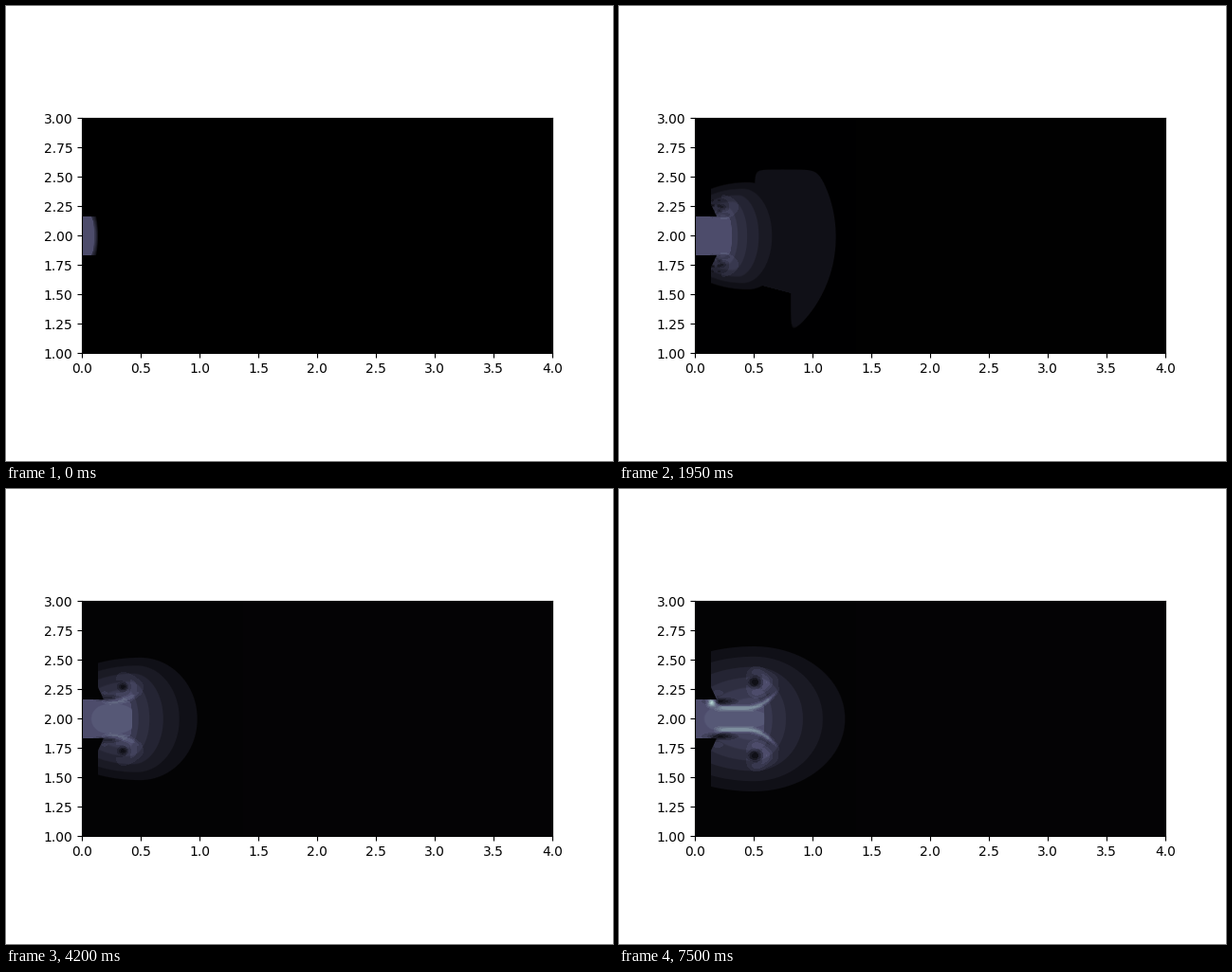
These frames come from a looping animation (640 by 480 pixels, 7.53 s). A matplotlib script:

```python
import numpy as np
import matplotlib.pyplot as plt
from matplotlib.animation import FuncAnimation

FRAMES, STEP = 251, 30
LOOP = FRAMES * STEP
W, H, UNIT = 170, 248, 124        # image size and pixels per unit
BANDS = 6
PIPE_END, PIPE_HALF, AXIS = 97, 20, 243

# stage pixel coordinates, measured from the jet axis
X, Y = np.meshgrid(80.5 + np.arange(W), 118.5 + np.arange(H))
DY = Y - AXIS
AY = np.abs(DY)


def soft(d):
    """Antialiased inside test for a signed distance in pixels."""
    return np.clip(d + 0.5, 0, 1)


def smooth_min(a, b, k=4):
    return -k * np.logaddexp(-a / k, -b / k)


def blob(x, dy, rx, ry):
    """Mirrored pair of Gaussian spots above and below the axis."""
    return np.exp(-((X - x) / rx) ** 2 - ((AY - dy) / ry) ** 2)


# flow region: inside the pipe, or right of its mouth with a shaded corner
IN_PIPE = soft(PIPE_HALF - AY) * (X > 80.6)
MOUTH = PIPE_END + 6 * np.clip(1 - (AY - PIPE_HALF) / 13, 0, 1)
REGION = np.maximum(IN_PIPE, soft(X - MOUTH))


def vortex(t):
    """Centre of the rolling vortex pair: x and distance from the axis."""
    return PIPE_END + 0.0062 * t - 14 * np.exp(-t / 300), 27 + 0.0015 * t


def bands(t):
    """Nested half ellipses that widen from the jet tip to the outer edge."""
    xv, _ = vortex(t)
    tip = xv + 10
    edge = min(PIPE_END + 0.077 * t, 155 + 0.0111 * t)
    height = min(28 + 0.046 * t, 49 + 0.0036 * t)
    middle = 90 + 52 * (1 - np.exp(-t / 900))
    back = 9 + 90 * (1 - np.exp(-t / 1500))
    power = 1.45 - 0.8 * np.exp(-(t / 1200) ** 2)
    layers = []
    for s in np.linspace(1, 0, BANDS):
        cx = xv + (middle - xv) * s
        b = 22 + (height - 22) * s
        a = max(tip + (edge - tip) * s ** power - cx, 1)
        left = 8 + 0.0035 * t + (back - 8) * s
        rho = np.hypot((X - cx) / np.where(X > cx, a, left), DY / b)
        layers.append(soft((1 - rho) * min(a, b)))
    return layers


def wave(t):
    """Pressure front: a growing circle that is eaten away from behind."""
    r = min(0.087 * t - 1e-5 * t * t, 136)
    d = r - np.hypot(X - PIPE_END, DY - 1)
    if t > 900:
        cut = PIPE_END + 0.187 * max(0, t - 1500)
        cut = cut - 0.1 * max(0, 2330 - t) * soft((55 - DY) / 10)
        top = 89 - 0.05 * max(0, t - 1560)
        d = smooth_min(d, smooth_min(X - cut, DY + top))
    return soft(d) * (t < 2330)


def jet(t, g):
    tip = vortex(t)[0] + 10
    half = PIPE_HALF - 7 * g ** 2.5 * np.clip((X - PIPE_END) / 12, 0, 1)
    body = soft(half - AY) * soft(tip - 3 * (AY / 20) ** 4 - X) * (X > 80.6)
    mid, length = (95 + tip) / 2, (tip - 85) / 2
    core = soft((1 - np.hypot((X - mid) / length, DY / (half - 3))) * 15)
    return body * (7 + core * (t > 2500))


def streaks(t, g):
    """Bright shear layers that bend outward at the jet tip."""
    end = vortex(t)[0] + 20 * min(1, 1.4 * g)
    u = np.clip((X - end + 28) / 28, 0, 1.2)
    line = PIPE_HALF - 9 * g ** 2.5 + 14 * g * u * u
    across = np.exp(-((AY - line) / 2.8) ** 2)
    along = soft((X - 104) / 10) * soft((end - X) / 12)
    return 5 * g ** 1.4 * across * along


def levels(t):
    g = t / LOOP
    xv, dv = vortex(t)
    layers = bands(t)
    layers[0] = np.maximum(layers[0], wave(t))
    q = np.maximum(sum(layers) * REGION, jet(t, g))

    size = 2 + 4.5 * g
    dark = min(1, 2 * g) * 0.85 * blob(xv, dv, size, size * 0.8)
    dark += 0.75 * g * blob(107, 22 - 4 * g ** 3, 13, 3)
    specks = np.sin(AY * 0.55) ** 2 * np.sin(X * 0.4) ** 2
    dark += 0.8 * np.exp(-((t - 2000) / 500) ** 2) * specks * blob(102, 31, 6, 9)
    q = q - np.round(q * np.clip(dark, 0, 1))

    ring = np.hypot(X - xv, AY - dv)
    light = streaks(t, g)
    light += 2.2 * g * np.exp(-((ring - 11) / 5) ** 2) * soft((X - xv + 6) / 12)
    light += 1.6 * g * blob(xv + 15, dv, 9, 9)
    light += 1.2 * g * blob(104, 27, 6, 3)
    flash = 12 * np.clip((t - 7020) / 480, 0, 1)
    light += flash * np.exp(-((X - 98) ** 2 + (Y - 226) ** 2) / 16)
    return q + np.round(light * REGION)


fig = plt.figure(figsize=(6.4, 4.8), dpi=100)
ax = plt.axes(xlim=(0, 4), ylim=(1, 3))
cmap = plt.get_cmap("bone")
img = ax.imshow(np.zeros((H, W, 4)), extent=(0, W / UNIT, 1, 3),
                interpolation="nearest")
ax.set(xlim=(0, 4), ylim=(1, 3), aspect="equal")


def draw(i):
    t = i * STEP
    back = 0.016 * np.clip((t - 1200) / 3000, 0, 1)
    ax.set_facecolor(cmap(float(back)))
    img.set_data(cmap(np.interp(levels(t), [0, 1, 22], [back, 0.075, 1.02])))
    return [img]


anim = FuncAnimation(fig, draw, frames=FRAMES, interval=STEP,
                     repeat=True, repeat_delay=0, blit=False)
plt.show()
```
